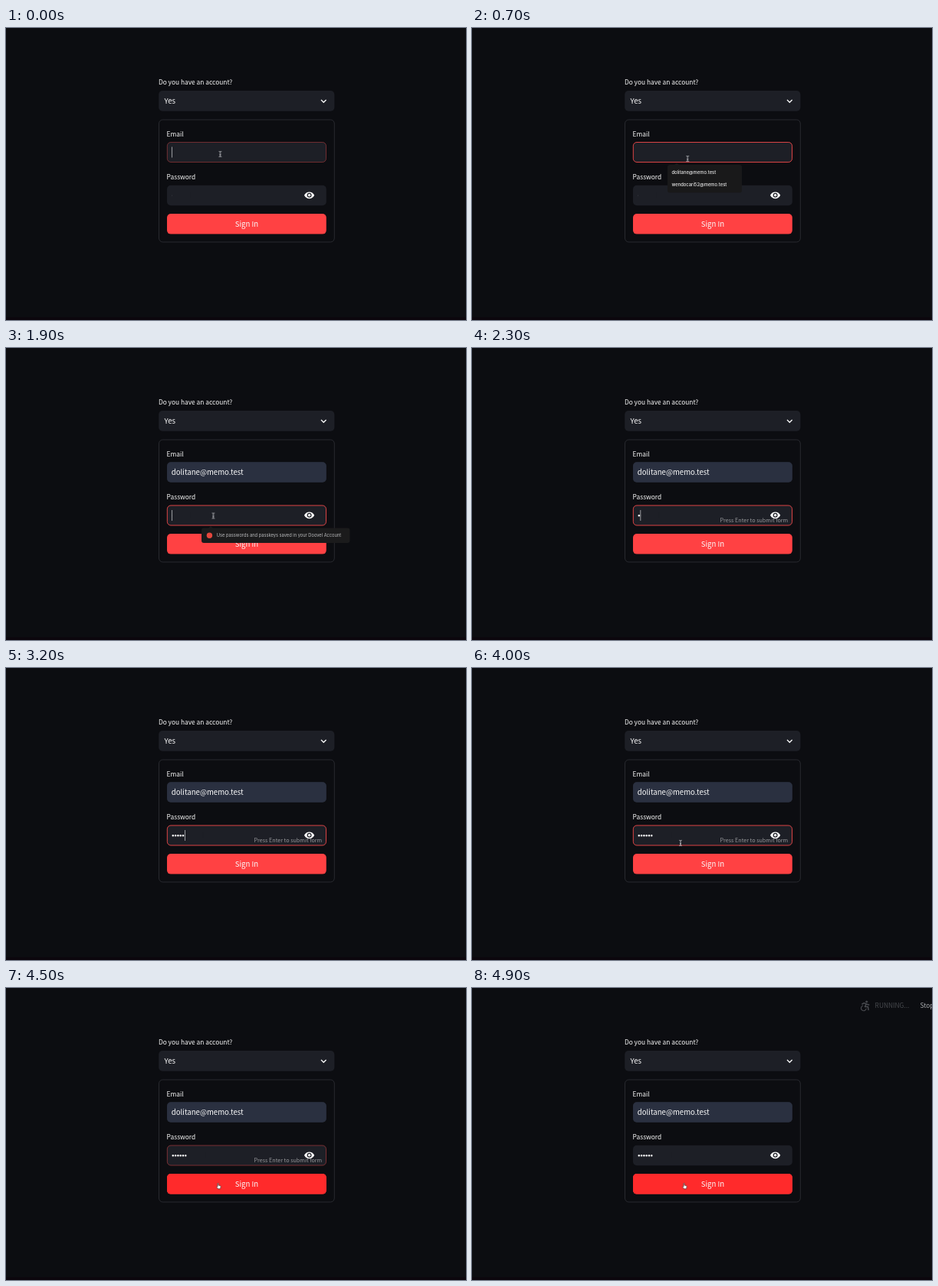
Write an HTML page that moves like this. It is 600x382 px and loops after 5000 ms.

```html
<!DOCTYPE html>
<html lang="en">
<head>
<meta charset="utf-8">
<title>Sign in form</title>
<style>
  html, body { margin: 0; width: 100%; height: 100%; overflow: hidden; background: #0c0d11; }
  svg { display: block; width: 100vw; height: 100vh; }
  text { fill: #fafafa; font-family: "Noto Sans CJK JP", "Noto Sans CJK SC", "Noto Sans CJK", "Open Sans", sans-serif; }
  .label { font-size: 8.4px; }
  .value { font-size: 9.6px; }
  .hint { font-size: 7.18px; fill: #fafafa; fill-opacity: .55; }
  .menu text { font-family: Inter, Roboto, sans-serif; }
  .menu .mail { font-size: 5.85px; font-weight: 500; fill: #e8e8e8; }
  .menu .note { font-size: 5.72px; fill: #bcbdbf; }
  .field { fill: #1d1f26; }
  .focus { fill: none; stroke: #ff4b4b; stroke-width: .85; }
  .caret { stroke: #e4e5e8; stroke-width: .7; }

  /* Parts are hidden until their keyframes show them; 2% is 100 ms. */
  .part { opacity: 0; animation: 5s step-end infinite; }
  .email-focus { animation-name: email-focus; }
  .email-fill { animation-name: email-fill; }
  .email-caret-empty { animation-name: email-caret-empty; }
  .email-caret-end { animation-name: email-caret-end; }
  .email-hint { animation-name: email-hint; }
  .email-menu { animation-name: email-menu; }
  .pass-focus { animation-name: pass-focus; }
  .pass-caret { animation-name: pass-caret; }
  .pass-hint { animation-name: pass-hint; }
  .pass-menu { animation-name: pass-menu; }
  .hover { animation-name: hover; }
  .running { animation-name: running; }
  .ibeam { animation-name: ibeam; }
  .arrow { animation-name: arrow; }
  .hand { animation-name: hand; }
  .typed { animation: typed 5s step-end infinite; }
  .pointer { animation: pointer 5s step-end infinite; }

  @keyframes email-focus { 0% { opacity: .45 } 2% { opacity: .65 } 4% { opacity: .85 } 6% { opacity: 1 } 36% { opacity: .5 } 38% { opacity: 0 } }
  @keyframes email-fill { 16% { opacity: 1 } 100% { opacity: 1 } }
  @keyframes email-caret-empty { 0% { opacity: 1 } 10% { opacity: 0 } }
  @keyframes email-caret-end { 28% { opacity: 1 } 34% { opacity: 0 } }
  @keyframes email-hint { 20% { opacity: 1 } 36% { opacity: 0 } }
  @keyframes email-menu { 4% { opacity: .6 } 6% { opacity: 1 } 20% { opacity: 0 } }
  @keyframes pass-focus { 36% { opacity: .5 } 38% { opacity: 1 } 90% { opacity: .5 } 92% { opacity: 0 } }
  @keyframes pass-caret { 38% { opacity: 1 } 74% { opacity: 0 } }
  @keyframes pass-hint { 44% { opacity: 1 } 92% { opacity: 0 } }
  @keyframes pass-menu { 38% { opacity: 1 } 44% { opacity: 0 } }
  @keyframes hover { 82% { opacity: .6 } 84% { opacity: 1 } 100% { opacity: 1 } }
  @keyframes running { 94% { opacity: .4 } 96% { opacity: .75 } 98% { opacity: 1 } 100% { opacity: 1 } }
  @keyframes ibeam { 0% { opacity: 1 } 16% { opacity: 0 } 34% { opacity: 1 } 44% { opacity: 0 } 78% { opacity: 1 } 82% { opacity: 0 } }
  @keyframes arrow { 16% { opacity: 1 } 34% { opacity: 0 } }
  @keyframes hand { 82% { opacity: 1 } 100% { opacity: 1 } }
  @keyframes typed {
    0% { transform: translateX(0) }
    44% { transform: translateX(3.3px) }
    50% { transform: translateX(6.6px) }
    54% { transform: translateX(9.9px) }
    58% { transform: translateX(13.2px) }
    62% { transform: translateX(16.5px) }
    70%, 100% { transform: translateX(19.8px) }
  }
  @keyframes pointer {
    0% { transform: translate(279.4px, 165px) }
    12% { transform: translate(280px, 168px) }
    14% { transform: translate(281.2px, 171px) }
    16% { transform: translate(289px, 182px) }
    18% { transform: translate(302px, 191px) }
    20% { transform: translate(307px, 198px) }
    22% { transform: translate(293px, 194px) }
    30% { transform: translate(289px, 199px) }
    32% { transform: translate(280px, 208px) }
    34% { transform: translate(272px, 217px) }
    36% { transform: translate(270.4px, 219.5px) }
    78% { transform: translate(270.6px, 222px) }
    80% { transform: translate(272px, 229px) }
    82% { transform: translate(276px, 248px) }
    84% { transform: translate(279px, 256px) }
    86% { transform: translate(279.3px, 258px) }
    88% { transform: translate(278.3px, 258.6px) }
    90%, 100% { transform: translate(277.4px, 259px) }
  }
</style>
</head>
<body>
<svg viewBox="0 0 600 382" preserveAspectRatio="none">
  <rect width="600" height="382" fill="#0c0d11"/>
  <rect y="378.5" width="600" height="3.5" fill="#0c060d"/>

  <text class="label" x="198.9" y="74.3">Do you have an account?</text>
  <rect class="field" x="199.2" y="82" width="229.2" height="26.8" rx="5"/>
  <text class="value" x="206.5" y="99.2">Yes</text>
  <path d="M411 94l3.3 3.3 3.3-3.3" fill="none" stroke="#fafafa" stroke-width="1.3"/>

  <rect x="199.5" y="120" width="228.8" height="160" rx="5" fill="none" stroke="#303238" stroke-width=".8"/>

  <text class="label" x="209.6" y="141.5">Email</text>
  <rect class="field" x="210" y="149.2" width="207.8" height="26.6" rx="5"/>
  <g class="part email-fill">
    <rect x="210" y="149.2" width="207.8" height="26.6" rx="5" fill="#2a3040"/>
    <text class="value" x="215.8" y="165.7">dolitane@memo.test</text>
  </g>
  <text class="hint part email-hint" x="323.5" y="172">Press Enter to submit form</text>
  <rect class="focus part email-focus" x="210.3" y="149.5" width="207.2" height="26" rx="4.7"/>
  <path class="caret part email-caret-empty" d="M216.4 155.5v14"/>
  <path class="caret part email-caret-end" d="M312 155.5v14"/>

  <text class="label" x="209.6" y="197.8">Password</text>
  <rect class="field" x="210" y="205.7" width="207.8" height="26.6" rx="5"/>
  <path d="M217.8 219.2h16.6" stroke="#fafafa" stroke-width="2.6" stroke-linecap="round" stroke-dasharray="0 3.3"/>
  <!-- The cover slides right to reveal one dot per key. -->
  <g class="typed">
    <rect class="field" x="216.2" y="215" width="24" height="8"/>
    <path class="caret part pass-caret" d="M216.4 212v14"/>
  </g>
  <g transform="translate(395.6 218.8)">
    <path d="M-6.6 0C-4-5.9 4-5.9 6.6 0C4 5.9-4 5.9-6.6 0Z" fill="#fff"/>
    <circle r="3" fill="#1d1f26"/>
    <circle r="1.8" fill="#fff"/>
  </g>
  <text class="hint part pass-hint" x="323.5" y="228.3">Press Enter to submit form</text>
  <rect class="focus part pass-focus" x="210.3" y="206" width="207.2" height="26" rx="4.7"/>

  <rect x="210" y="243" width="207.8" height="26.6" rx="5" fill="#ff4143"/>
  <rect class="part hover" x="210" y="243" width="207.8" height="26.6" rx="5" fill="#ff2a2b"/>
  <text class="value" x="313.9" y="260" text-anchor="middle">Sign In</text>

  <g class="menu part email-menu">
    <path d="M263.5 179.5l3.5-3 3.5 3z" fill="#19191a"/>
    <rect x="255" y="179" width="97" height="36.5" rx="3" fill="#19191a"/>
    <text class="mail" x="260.5" y="191">dolitane@memo.test</text>
    <text class="mail" x="260.5" y="207">wendocari52@memo.test</text>
  </g>

  <g class="menu part pass-menu">
    <path d="M263.5 236l3.5-3 3.5 3z" fill="#1b1b1c"/>
    <rect x="255" y="235.5" width="193.5" height="19.5" rx="3" fill="#1b1b1c"/>
    <circle cx="265.4" cy="245.2" r="3.7" fill="#e5473d"/>
    <text class="note" x="274.8" y="247.3">Use passwords and passkeys saved in your Doovel Account</text>
  </g>

  <g class="part running">
    <g fill="none" stroke="#494b50" stroke-width="1.5" stroke-linecap="round" stroke-linejoin="round">
      <circle cx="514.7" cy="18" r="1.1" fill="#494b50" stroke-width=".8"/>
      <path d="M509 21l2.3-1.4 3 1.4-1.8 3.4h4l.6 4.2M514.3 21l3.4 1"/>
      <path d="M509.6 23.2a3.4 3.4 0 1 0 4.6 4" stroke-width="1.2"/>
    </g>
    <text class="label" x="525.6" y="26.1" style="fill:#494b50">RUNNING...</text>
    <text class="label" x="584.5" y="26.1" style="fill:#a9abae">Stop</text>
  </g>

  <g class="pointer">
    <path class="part ibeam" d="M-1.7-3.6Q0-3.6 0-2.6Q0-3.6 1.7-3.6M0-2.6V2.6M-1.7 3.6Q0 3.6 0 2.6Q0 3.6 1.7 3.6M-1 .9H1" fill="none" stroke="#d4d5d8" stroke-width=".8"/>
    <path class="part arrow" d="M-1.8-3.8V2.4L-.4 1.2.6 3.5 1.7 3 .7.8H2.6Z" fill="#0b0b0c" stroke="#d8d8da" stroke-width=".6"/>
    <path class="part hand" d="M-1.4.8V-3.4Q-.8-4.2-.2-3.4V-.9L2.2-.3Q2.9 0 2.7 1L2 3.8H-1L-2.6 1.2Q-2.8.1-1.4.8Z" fill="#fff" stroke="#222" stroke-width=".6"/>
  </g>
</svg>
</body>
</html>
```
